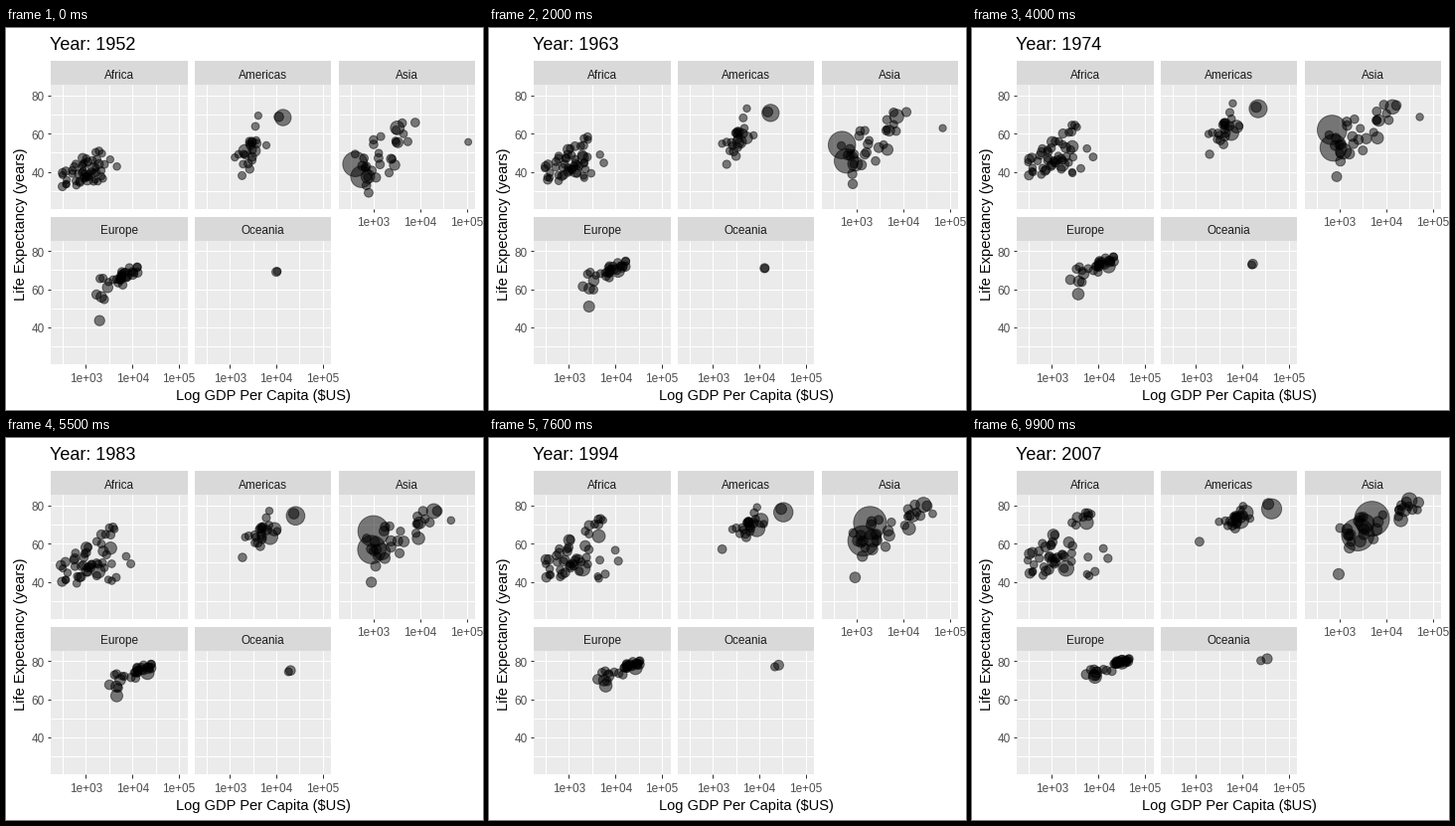
Animation of 480 by 384 pixels, one loop 10 s. Source, as a matplotlib script:

```python
import matplotlib.pyplot as plt
import numpy as np
from matplotlib.animation import FuncAnimation
from matplotlib.patches import Rectangle

plt.rcParams["font.family"] = "Liberation Sans"

W, H, DPI = 480, 384, 96
FRAMES, STEP, SURVEYS = 100, 9, 12   # a survey every STEP frames (five years)
PANEL_W, PANEL_H, STRIP_H = 137.44, 124.6, 23.8
COLS, ROWS = (45.3, 190.05, 334.9), (57.1, 213.6)
X_MIN, X_SPAN = 2.2486, 2.9401       # log10 of income
Y_MAX, Y_SPAN = 85.55, 64.9          # years of life

rng = np.random.default_rng(4)
t = np.linspace(0, 1, SURVEYS)
ease = 1.5 * t - .5 * t * t          # life grows faster early on


def mix(ends, s=t):
    return ends[0] + (ends[1] - ends[0]) * s


def landmark(pop, start, middle, end):
    """One notable dot on a smooth curve through three (income, life) points."""
    a, m, b = [np.array([[np.log10(x)], [y]]) for x, y in (start, middle, end)]
    x, y = (1 - t) * (1 - 2 * t) * a + 4 * t * (1 - t) * m + t * (2 * t - 1) * b
    return np.array([[x, y, mix(pop)]])


def cloud(n, income, spread, life, life_sd, pop, corr=.5):
    """n dots around a drifting mean; pairs give first and last values."""
    z = np.clip(rng.standard_normal((2, n, 1)), -1.8, 1.8)
    z = z + .08 * rng.standard_normal((2, n, SURVEYS))
    x = mix(income) + mix(spread) * z[0]
    y = mix(life, ease) + mix(life_sd) * (corr * z[0] + np.sqrt(1 - corr ** 2) * z[1])
    people = mix(pop) * np.exp(.8 * rng.standard_normal((n, 1)))
    return np.stack([x, y, people], axis=1)


def to_x(col, log_income):
    return COLS[col] + (log_income - X_MIN) / X_SPAN * PANEL_W


def to_y(row, life):
    return ROWS[row] + (Y_MAX - life) / Y_SPAN * PANEL_H


def radius(pop):
    size = 2 + 10 * np.sqrt(np.clip(pop - .06, 0, None) / 1318.6)
    return .5 * (2.845 * size + .945)


REGIONS = [
    ("Africa", 0, 0, [
        landmark((33, 135), (1077, 36), (1780, 45), (2014, 47)),
        landmark((22, 80), (1419, 42), (3150, 56), (5581, 71)),
        cloud(36, (2.93, 2.98), (.24, .26), (39, 53), (4.5, 6.5), (2, 6), .3),
        cloud(8, (3.2, 3.72), (.2, .2), (44, 73), (4, 2), (2, 6)),
        cloud(6, (3.4, 3.95), (.2, .2), (42, 52), (4, 5), (1, 4)),
    ]),
    ("Americas", 1, 0, [
        landmark((157, 301), (13990, 68.4), (24500, 74), (42952, 78.2)),
        landmark((15, 33), (11367, 68.8), (22500, 75), (36319, 80.7)),
        landmark((57, 190), (2109, 51), (6850, 62.4), (9066, 72.4)),
        landmark((30, 109), (3478, 51), (8600, 66.2), (11978, 76.2)),
        landmark((3, 8), (1840, 38), (1930, 51.5), (1202, 61)),
        cloud(20, (3.47, 3.88), (.2, .2), (54, 73.5), (8, 3.2), (3, 6)),
    ]),
    ("Asia", 2, 0, [
        landmark((556, 1319), (400, 44), (850, 65), (4959, 73)),
        landmark((372, 1110), (547, 37.4), (834, 55.4), (2452, 64.7)),
        landmark((86, 127), (3217, 63), (17500, 76), (31656, 82.6)),
        landmark((82, 224), (750, 37.5), (1380, 54), (3541, 70.6)),
        landmark((.2, 2.5), (108382, 55.6), (48000, 71), (47307, 77.6)),
        landmark((8, 32), (779, 29), (880, 39), (950, 44)),
        cloud(15, (2.95, 3.35), (.25, .25), (45, 66), (7, 4.5), (5, 18)),
        cloud(12, (3.55, 4.4), (.3, .3), (54, 77), (7, 3), (3, 10)),
    ]),
    ("Europe", 0, 1, [
        landmark((22, 71), (1969, 43.6), (4250, 60.3), (8458, 71.8)),
        landmark((69, 82), (7144, 67.5), (19500, 73.2), (32170, 79.4)),
        cloud(18, (3.85, 4.47), (.14, .1), (67.5, 79.5), (2.5, 1), (8, 10)),
        cloud(10, (3.5, 4.02), (.2, .18), (60.5, 74), (4.5, 1.5), (6, 8)),
    ]),
    ("Oceania", 1, 1, [
        landmark((9, 20), (10040, 69.1), (19000, 74.4), (34435, 81.2)),
        landmark((2, 4), (10557, 69.4), (17500, 73.8), (25185, 80.2)),
    ]),
]

fig = plt.figure(figsize=(W / DPI, H / DPI), dpi=DPI, facecolor="white")
ax = fig.add_axes([0, 0, 1, 1])
ax.set(xlim=(0, W), ylim=(H, 0))
ax.axis("off")


def box(x, y, w, h, color):
    ax.add_patch(Rectangle((x, y), w, h, fc=color, ec="none", lw=0))


def line(x0, y0, x1, y1, color="white"):
    ax.plot((x0, x1), (y0, y1), color=color, lw=.75, solid_capstyle="butt")


def text(x, y, s, pt, color="black", ha="center", **kw):
    return ax.text(x, y, s, fontsize=pt, color=color, ha=ha, va="baseline", **kw)


def panel(name, col, row):
    x, y = COLS[col], ROWS[row]
    right, bottom = x + PANEL_W, y + PANEL_H
    box(x, y, PANEL_W, PANEL_H, "#ebebeb")
    box(x, y - STRIP_H, PANEL_W, STRIP_H, "#d9d9d9")
    text(x + PANEL_W / 2, y - 6.4, name, 8.8, "#1a1a1a")
    for v in np.arange(2.5, 5.1, .5):
        line(to_x(col, v), y, to_x(col, v), bottom)
    for v in range(30, 81, 10):
        line(x, to_y(row, v), right, to_y(row, v))
    if col == 0:
        for v in (40, 60, 80):
            ty = to_y(row, v)
            line(x - 3.67, ty, x, ty, "#333333")
            text(38.9, ty + 5.4, str(v), 8.8, "#4d4d4d", "right")
    if row == 1 or col == 2:
        for v in (3, 4, 5):
            tx = to_x(col, v)
            line(tx, bottom, tx, bottom + 3.67, "#333333")
            text(tx, bottom + 17.6, f"1e+0{v}", 8.8, "#4d4d4d")


path = []
for name, col, row, groups in REGIONS:
    panel(name, col, row)
    income, life, pop = np.concatenate(groups).transpose(1, 0, 2)
    path.append([to_x(col, income), to_y(row, life), radius(pop)])
path = np.concatenate(path, axis=1)   # (x, y, r) by dot by survey

text((COLS[0] + COLS[2] + PANEL_W) / 2, 374, "Log GDP Per Capita ($US)", 11)
text(19, 197.5, "Life Expectancy (years)", 11, rotation=90, rotation_mode="anchor")
title = text(44.5, 22, "", 13.5, ha="left")

ink = (0, 0, 0, .5)
points = ax.scatter(path[0, :, 0], path[1, :, 0], facecolors=[ink], edgecolors=[ink],
                    linewidths=.72, zorder=3)


def update(i):
    k = min(i // STEP, SURVEYS - 2)
    x, y, r = mix((path[:, :, k], path[:, :, k + 1]), i / STEP - k)
    points.set_offsets(np.column_stack([x, y]))
    points.set_sizes((1.5 * r) ** 2)
    title.set_text(f"Year: {round(1952 + 55 * i / (FRAMES - 1))}")
    return points, title


anim = FuncAnimation(fig, update, frames=FRAMES, init_func=lambda: update(0),
                     interval=100, repeat=True, repeat_delay=0)
plt.show()
```
